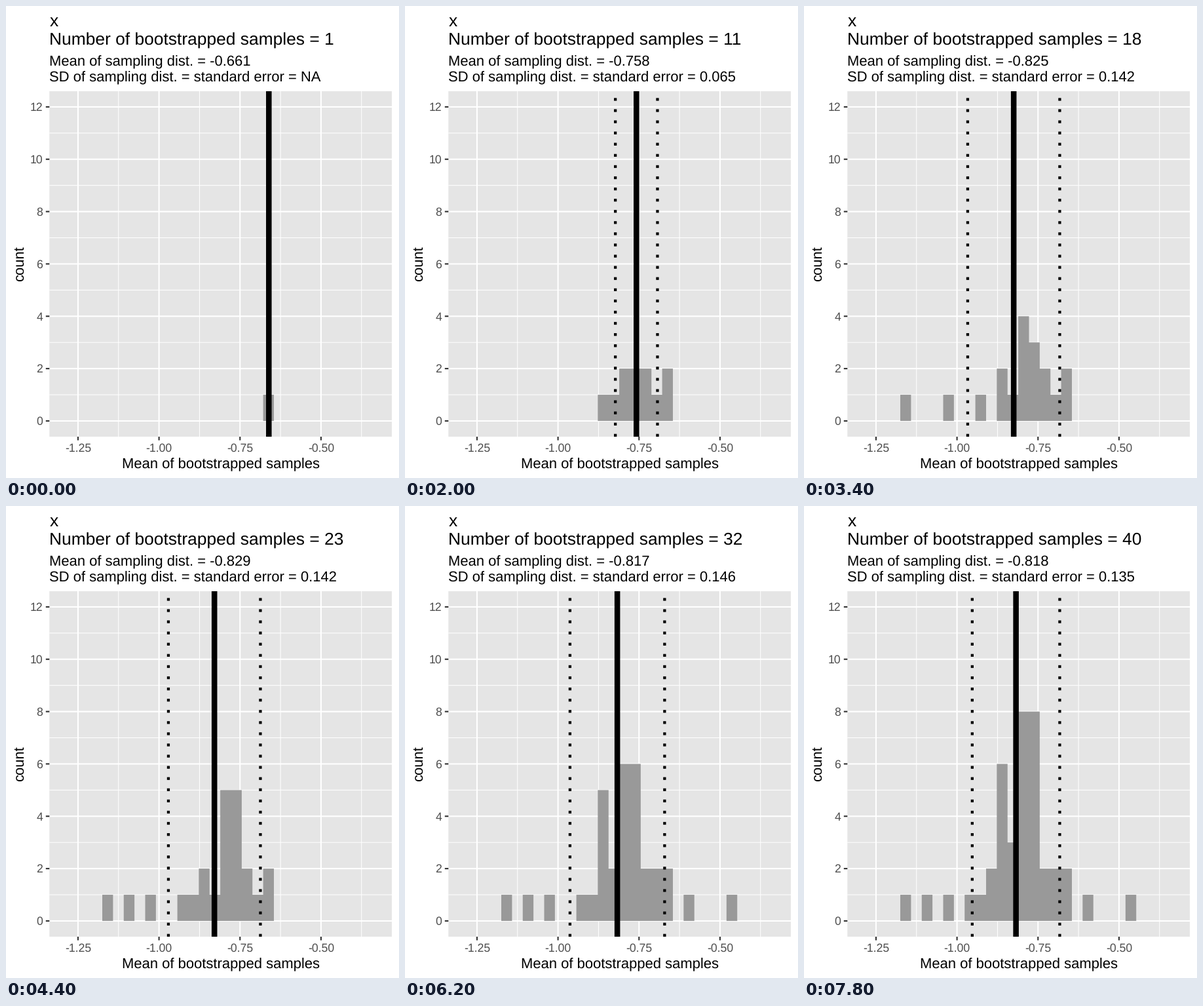
A matplotlib script that plays this animation: 600 by 720 pixels, repeating every 8 s.

```python
import matplotlib.pyplot as plt
import numpy as np
from matplotlib.animation import FuncAnimation

W, H, DPI = 600, 720, 100
PT = 72 / DPI  # points per pixel
LEFT, RIGHT, TOP, BOTTOM = 66.3, 589, 130, 657
BIN, BINS = 0.0331, 22

plt.rcParams.update({
    "font.family": "Liberation Sans",
    "text.hinting": "none",
    "path.snap": False,
})

# Key points: samples so far, their mean and SD, and the bins
# between which the newest batch of samples strays
KEYS = np.array([
    (5, -0.716, 0.065, 15, 11),
    (11, -0.758, 0.065, 12.55, 8.6),
    (18, -0.825, 0.142, 11.55, -0.4),
    (23, -0.829, 0.142, 12.4, 2.4),
    (32, -0.817, 0.146, 8.6, 20.6),
    (40, -0.818, 0.135, 11.6, 5.6),
])
FIRST_MEAN = -0.661
TOTALS = KEYS[:, 0].astype(int)


def batch(size, start, end):
    """Samples crowd near the start bin, then stray towards the end bin."""
    u = np.linspace(0, 1, size)
    return np.round(start + (end - start) * u ** 2.5).astype(int)


SIZES = np.diff(TOTALS, prepend=0)
SAMPLES = np.concatenate([batch(size, *key[3:]) for size, key in zip(SIZES, KEYS)])
COUNT = np.arange(1, len(SAMPLES) + 1)
MEAN = np.interp(COUNT, [1, *TOTALS], [FIRST_MEAN, *KEYS[:, 1]])
SD = np.interp(COUNT, TOTALS, KEYS[:, 2])


def px(v):
    return 233.6 + (v + 1) * 494.67


def py(c):
    return 632.95 - c * 39.92


fig = plt.figure(figsize=(W / DPI, H / DPI), dpi=DPI, facecolor="white")
ax = fig.add_axes([0, 0, 1, 1])
ax.axis("off")


def line(xs, ys, width, color, z=1, **kw):
    return ax.plot(xs, ys, color=color, lw=width * PT, zorder=z,
                   solid_capstyle="butt", dash_capstyle="butt", **kw)[0]


def label(x, y, s, size, color="black", **kw):
    return ax.text(x, y, s, fontsize=size * PT, color=color, va="baseline", **kw)


def grid_x(v, width):
    line([px(v)] * 2, [TOP, BOTTOM], width, "white")


def grid_y(c, width):
    line([LEFT, RIGHT], [py(c)] * 2, width, "white")


ax.add_patch(plt.Rectangle((LEFT, TOP), RIGHT - LEFT, BOTTOM - TOP,
                           color="#e5e5e5", lw=0, zorder=0))

for v in np.arange(-1.25, -0.25, 0.25):
    grid_x(v + 0.125, 1.07)
    grid_x(v, 2.13)
    line([px(v)] * 2, [BOTTOM, BOTTOM + 5.5], 2.13, "#333333")
    label(px(v), 679.8, f"{v:.2f}", 17.6, "#4d4d4d", ha="center")
for c in range(1, 12, 2):
    grid_y(c, 1.07)
for c in range(0, 13, 2):
    grid_y(c, 2.13)
    line([LEFT - 5.5, LEFT], [py(c)] * 2, 2.13, "#333333")
    label(56.4, py(c) + 6.3, str(c), 17.6, "#4d4d4d", ha="right")

label((LEFT + RIGHT) / 2, 705.4, "Mean of bootstrapped samples", 22, ha="center")
label(26.8, (TOP + BOTTOM) / 2, "count", 22, ha="center",
      rotation=90, rotation_mode="anchor")
label(LEFT, 31, "x", 26.4)
title = label(LEFT, 60, "", 26.4)
mean_text = label(LEFT, 91, "", 22)
sd_text = label(LEFT, 115.2, "", 22)

edges = px((np.arange(BINS + 1) - 35.5) * BIN)
bars = ax.stairs(np.zeros(BINS), edges, baseline=py(0),
                 fill=True, color="#999999", lw=0, zorder=2)
mean_line = line([0, 0], [BOTTOM, TOP], 8.54, "black", 3)
sd_lines = [line([0, 0], [BOTTOM, TOP], 4.27, "black", 4, ls=(0, (1, 3)))
            for _ in range(2)]
ax.set_xlim(0, W)
ax.set_ylim(H, 0)


def draw(i):
    mean, sd = MEAN[i], SD[i]
    heights = np.bincount(SAMPLES[:i + 1], minlength=BINS)
    bars.set_data(values=py(heights))
    mean_line.set_xdata([px(mean)] * 2)
    for ln, sign in zip(sd_lines, (-1, 1)):
        ln.set_visible(i > 0)
        ln.set_xdata([px(mean + sign * sd)] * 2)
    shown_sd = round(float(sd), 3) if i else "NA"
    title.set_text(f"Number of bootstrapped samples = {i + 1}")
    mean_text.set_text(f"Mean of sampling dist. = {round(float(mean), 3)}")
    sd_text.set_text(f"SD of sampling dist. = standard error = {shown_sd}")
    return [bars, mean_line, *sd_lines, title, mean_text, sd_text]


anim = FuncAnimation(fig, draw, frames=len(SAMPLES), init_func=lambda: draw(0),
                     interval=200, repeat=True, repeat_delay=0)
plt.show()
```
